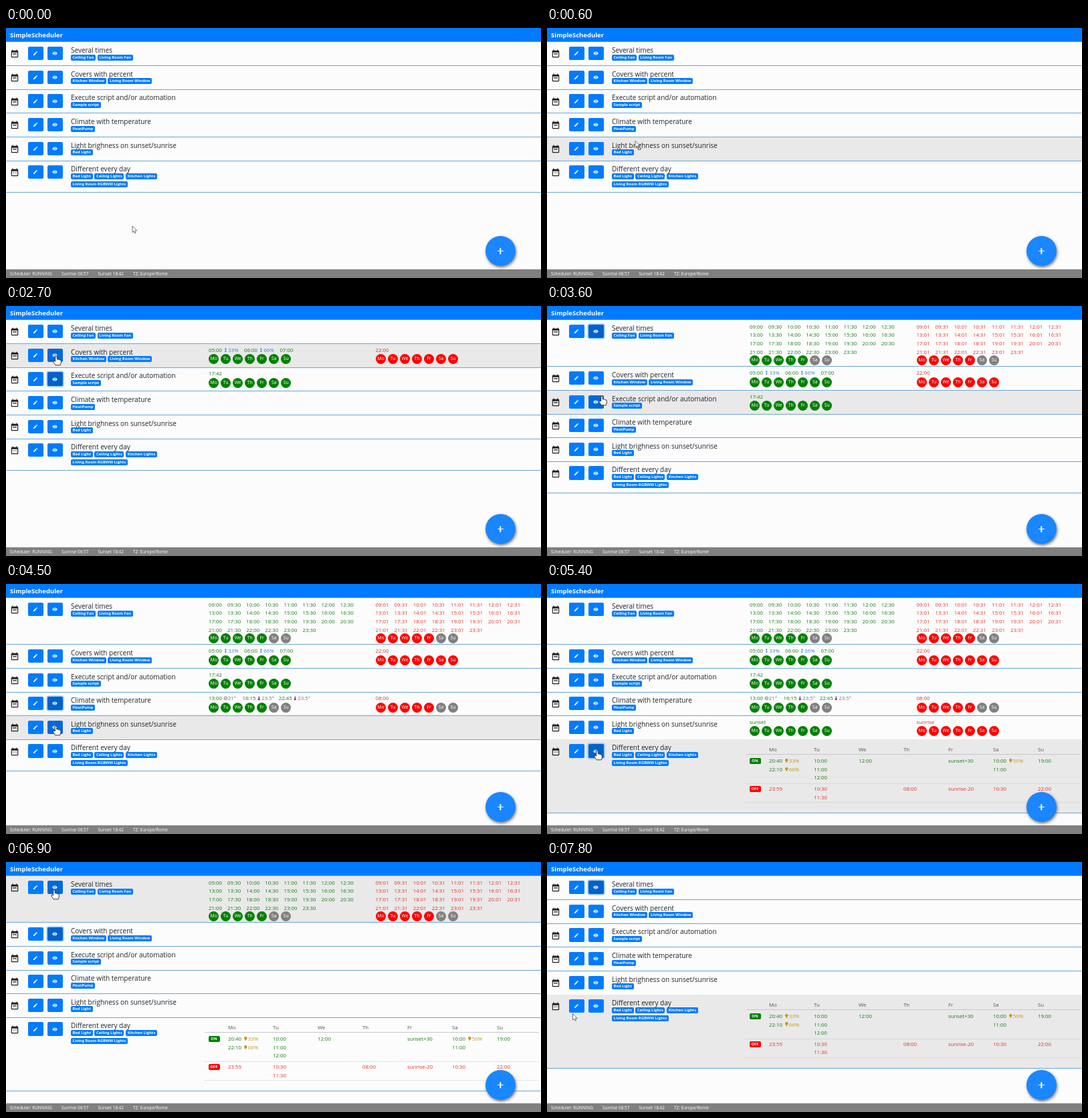
These frames come from a looping animation (800x375 px, 8000 ms). An HTML page:

```html
<!DOCTYPE html>
<html lang="en">
<head>
<meta charset="utf-8">
<title>SimpleScheduler</title>
<style>
  html, body { margin: 0; width: 100%; height: 100%; overflow: hidden; }
  body { position: relative; background: #fcfcfc; color: #212529; font: 7.85px/12px "Open Sans", "Noto Sans", sans-serif; white-space: nowrap; }
  div, span, svg { position: absolute; box-sizing: border-box; }
  .t { margin-top: -6px; }
  #bar { left: 0; top: 0; width: 800px; height: 21px; background: #007bff; border-bottom: 1px solid #4a9cf0; }
  #bar .t { color: #fff; font-size: 9.5px; font-weight: 700; }
  #foot { left: 0; top: 362px; width: 800px; height: 13px; background: #808080; color: #fff; font-size: 6.43px; }
  .row { left: 0; width: 800px; border-bottom: 1px solid #6ba6d8; }
  .row.hover { background: #e9e9e9; }
  .name { font-size: 10.05px; }
  .btn { top: 7px; width: 22.5px; height: 20.2px; border-radius: 2px; background: #007bff; }
  .btn.hover { background: #0069d9; }
  .btn.focus { background: #0062cc; box-shadow: 0 0 0 1.8px #80bdffb0; }
  .btn svg { left: 7.2px; top: 6.2px; width: 8px; height: 8px; fill: #fff; }
  .chips { left: 97px; top: 18.6px; width: 142px; display: flex; flex-wrap: wrap; gap: 3.2px 2.8px; }
  .chip { position: static; height: 9px; padding: 0 2.6px; border-radius: 2px; background: #007bff; color: #fff; font-size: 5.85px; font-weight: 700; line-height: 8.8px; }
  .flag { left: 302.5px; width: 17px; height: 9px; border-radius: 2px; color: #fff; font-size: 5.8px; font-weight: 700; line-height: 9px; text-align: center; }
  .day { width: 15px; height: 15px; border-radius: 50%; color: #fff; font-size: 6.9px; line-height: 14.6px; text-align: center; }
  .rule { left: 297px; width: 500px; border-top: 1px dotted #c8cacc; }
  .rule.head { border-top: 1px solid #c4c6c8; }
  .more { left: 0; top: 0; display: none; }
  .open .more { display: block; }
  #add { left: 717px; top: 312px; width: 45px; height: 45px; border-radius: 50%; background: #1a86ff; box-shadow: 1px 2px 4px #0008; }
  #add::before, #add::after { content: ""; position: absolute; background: #fff; left: 17.7px; top: 21.5px; width: 9px; height: 1.6px; }
  #add::after { transform: rotate(90deg); }
  #cursor svg { left: 0; top: 0; overflow: visible; stroke-linejoin: round; }
</style>
</head>
<body>
<div id="bar"></div>
<div id="list"></div>
<div id="foot"></div>
<div id="add"></div>
<div id="cursor">
  <svg id="arrow" width="8" height="12"><path d="M0 0V9.6L2.2 7.6 3.7 11 5.2 10.3 3.8 7.1H6.8Z" fill="#fff" stroke="#555" stroke-width=".8"/></svg>
  <svg id="hand" width="11" height="15"><path d="M-1.3 8V1Q-1.3-.2 0-.2T1.3 1V5Q2.7 4.2 3.6 5.4 5 4.8 5.8 6 7.4 5.6 7.4 7.4V10L6.2 13.8H-.8L-4 9.2Q-4.6 7.4-3 7Z" fill="#fff" stroke="#222" stroke-width=".9"/></svg>
</div>
<script>
const GREEN = '#177a17', RED = '#dd3328', GRAY = '#808080';
const DAYS = ['Mo', 'Tu', 'We', 'Th', 'Fr', 'Sa', 'Su'];
const $ = id => document.getElementById(id);

const text = (x, y, s, color = '', cls = '') =>
  `<span class="t ${cls}" style="left:${x}px;top:${y}px;color:${color}">${s}</span>`;

const icon = (path, style, box = 24) =>
  `<svg viewBox="0 0 ${box} ${box}" style="${style}"><path fill-rule="evenodd" d="${path}"/></svg>`;

const PENCIL = 'M3 17.2V21h3.8L17.8 10 14 6.2ZM20.7 7a1 1 0 0 0 0-1.4L18.4 3.3a1 1 0 0 0-1.4 0L15.1 5.1 18.9 8.9Z';
const EYE = 'M12 4.5C7 4.5 2.7 7.6 1 12 2.7 16.4 7 19.5 12 19.5S21.3 16.4 23 12C21.3 7.6 17 4.5 12 4.5ZM12 17a5 5 0 1 1 0-10 5 5 0 0 1 0 10ZM12 9a3 3 0 1 0 0 6 3 3 0 0 0 0-6Z';
const CALENDAR = 'M16 1V3H8V1H6V3H5A2 2 0 0 0 3 5V19A2 2 0 0 0 5 21H19A2 2 0 0 0 21 19V5A2 2 0 0 0 19 3H18V1ZM5 8H19V19H5Z';
const BAR = 'M7 10.5H17V13H7Z', DOTS = 'M7 11H9V13H7ZM11 11H13V13H11ZM15 11H17V13H15Z';
const ARROWS = 'M5 0 7.5 3H5.6V7H7.5L5 10 2.5 7H4.4V3H2.5Z';
const DIAL = 'M5 1A4 4 0 1 0 5 9 4 4 0 0 0 5 1ZM5 2.2A2.8 2.8 0 1 1 5 7.8 2.8 2.8 0 0 1 5 2.2ZM3 4.4H7V5.6H3Z';
const THERMO = 'M4 1.3Q5-.5 6 1.3V5.4A2.3 2.3 0 1 1 4 5.4Z';
const BULB = 'M5 0A3.3 3.3 0 0 0 3.4 6.3V7.5H6.6V6.3A3.3 3.3 0 0 0 5 0ZM3.7 8.2H6.3V9.5H3.7Z';

// a small symbol followed by its value
const value = (x, y, path, s, color, textColor = color) =>
  icon(path, `left:${x - .5}px;top:${y - 3.2}px;width:6.6px;height:6.6px;fill:${color}`, 10) + text(x + 6.8, y, s, textColor);

const week = (x, y, color, active = 7) => DAYS.map((d, i) =>
  `<span class="day" style="left:${x + 18 * i}px;top:${y - 7.5}px;background:${i < active ? color : GRAY}">${d}</span>`).join('');
const greenWeek = (n, y = 23.2) => week(303.2, y, 'green', n);
const redWeek = (n, y = 23.2) => week(553, y, 'red', n);

function halfHours(x, minute, color) {
  let out = '';
  for (let i = 0; i < 30; i++) {
    const hour = String(9 + (i >> 1)).padStart(2, '0');
    const min = String(minute + 30 * (i % 2)).padStart(2, '0');
    out += text(x + 28.1 * (i % 8), 9.6 + 12.6 * (i >> 3), hour + ':' + min, color);
  }
  return out;
}

function dayTable() {
  const col = i => 332 + 67 * i;
  const cell = (i, y, list, color) => list.split(' ').map((s, k) => text(col(i), y + 12.5 * k, s, color)).join('');
  const on = ['20:40 22:10', '10:00 11:00 12:00', '12:00', '', 'sunset+30', '10:00 11:00', '19:00'];
  const off = ['23:59', '10:30 11:30', '', '08:00', 'sunrise-20', '10:30', '22:00'];
  const flag = (y, s, color) => `<span class="flag" style="top:${y}px;background:${color}">${s}</span>`;
  const bulb = (x, y, s) => value(x, y, BULB, s, '#c8961e');
  const rule = (y, cls) => `<div class="rule ${cls}" style="top:${y}px"></div>`;
  return DAYS.map((d, i) => text(col(i), 14.6, d, '#555') + cell(i, 32, on[i], GREEN) + cell(i, 73.8, off[i], RED)).join('') +
    rule(22, 'head') + rule(66, '') + rule(93.6, '') +
    flag(27.4, 'ON', 'green') + flag(69.5, 'OFF', 'red') +
    bulb(355, 32, '33%') + bulb(355, 44.5, '66%') + bulb(690, 32, '50%');
}

const at = (x, s) => text(x, 9, s, GREEN);
const red = s => text(552.5, 9, s, RED);
const ROWS = [
  { name: 'Several times', chips: ['Ceiling Fan', 'Living Room Fan'], tall: 69.8,
    more: halfHours(303, 0, GREEN) + halfHours(552.5, 1, RED) + greenWeek(5, 60.6) + redWeek(5, 60.6) },
  { name: 'Covers with percent', chips: ['Kitchen Window', 'Living Room Window'],
    more: at(303, '05:00') + value(325.5, 9, ARROWS, '33%', '#3f86c6') + at(356, '06:00') +
      value(378.5, 9, ARROWS, '66%', '#3f86c6') + at(409.5, '07:00') + red('22:00') + greenWeek() + redWeek() },
  { name: 'Execute script and/or automation', chips: ['Sample script'], more: at(303, '17:42') + greenWeek() },
  { name: 'Climate with temperature', chips: ['HeatPump'],
    more: at(303, '13:00') + value(325, 9, DIAL, '21°', '#777') + at(353.5, '16:15') +
      value(375.5, 9, THERMO, '23.5°', '#8a2a9a', '#86688c') + at(407.7, '22:45') +
      value(429.5, 9, THERMO, '23.5°', '#8a2a9a', '#86688c') + red('08:00') + greenWeek(5) + redWeek(5) },
  { name: 'Light brighness on sunset/sunrise', chips: ['Bed Light'],
    more: at(303, 'sunset') + red('sunrise') + greenWeek() + redWeek() },
  { name: 'Different every day', chips: ['Bed Light', 'Ceiling Lights', 'Kitchen Lights', 'Living Room RGBWW Lights'],
    short: 47.2, tall: 110, more: dayTable() }
];

$('bar').innerHTML = text(6, 10.5, 'SimpleScheduler');
$('foot').innerHTML = [[6, 'Scheduler: RUNNING'], [83, 'Sunrise 06:57'], [137.5, 'Sunset 18:42'], [190, 'TZ: Europe/Rome']]
  .map(([x, s]) => text(x, 6.8, s)).join('');
$('list').innerHTML = ROWS.map((r, i) => `<div class="row">
  ${icon(CALENDAR + (i == 5 ? DOTS : BAR), 'left:6px;top:11.2px;width:14px;height:14px;fill:#222')}
  <div class="btn" style="left:33px">${icon(PENCIL, '')}</div><div class="btn" style="left:62px">${icon(EYE, '')}</div>
  ${text(97, 12, r.name, '', 'name')}
  <div class="chips">${r.chips.map(c => `<span class="chip">${c}</span>`).join('')}</div>
  <div class="more">${r.more}</div></div>`).join('');
const rowEls = [...document.querySelectorAll('.row')];

const STEP = 300, LOOP = 8000;
// step, x, y of the pointer tip
const PATH = [[0, 189, 297], [1, 189, 297], [3, 75, 42], [4, 75, 40], [5, 75, 67], [6, 76, 74], [7, 76, 110], [8, 76, 110],
  [10, 74, 40], [11, 74, 40], [12, 82, 135], [13, 76, 176], [14, 76, 176], [15, 74.5, 213], [16, 74.5, 213],
  [17, 75, 250], [18, 75, 250], [19, 75, 214], [20, 77, 168], [21, 76, 142], [22, 75, 106], [23, 72, 42],
  [24, 72, 42], [26, 38.5, 227.5]];
// step, row whose details are toggled
const CLICKS = [[3, 0], [4, 0], [6, 1], [8, 2], [10, 0], [14, 3], [16, 4], [18, 5], [19, 4], [21, 3], [22, 2], [23, 1], [24, 0]];

function pointer(step) {
  const n = PATH.findIndex(p => p[0] >= step);
  const b = PATH[n], a = PATH[Math.max(0, n - 1)];
  const f = b[0] == a[0] ? 0 : (step - a[0]) / (b[0] - a[0]);
  return [a[1] + (b[1] - a[1]) * f, a[2] + (b[2] - a[2]) * f];
}

function draw(step) {
  const [x, y] = pointer(step);
  const past = CLICKS.filter(c => c[0] <= step);
  const focus = past.length ? past[past.length - 1][1] : -1;
  let top = 21.2, onButton = false;
  rowEls.forEach((el, i) => {
    const { short = 35.6, tall = short } = ROWS[i];
    const open = past.filter(c => c[1] == i).length % 2 == 1;
    const height = open ? tall : short;
    const inside = y >= top && y < top + height;
    el.style.top = top + 'px';
    el.style.height = height + 0.5 + 'px';
    el.classList.toggle('open', open);
    el.classList.toggle('hover', inside);
    el.querySelectorAll('.btn').forEach((btn, k) => {
      const left = k ? 62 : 33;
      const over = x >= left && x < left + 22.5 && y >= top + 5.5 && y < top + 27.6;
      onButton ||= over;
      btn.classList.toggle('hover', over);
      btn.classList.toggle('focus', k == 1 && i == focus);
    });
    top += height;
  });
  $('cursor').style.transform = `translate(${x}px, ${y}px)`;
  $('hand').style.display = onButton ? 'block' : 'none';
  $('arrow').style.display = onButton ? 'none' : 'block';
}

const start = performance.now();
let shown = -1;
function tick() {
  const step = Math.floor((performance.now() - start) % LOOP / STEP);
  if (step != shown) draw(shown = step);
  requestAnimationFrame(tick);
}
tick();
</script>
</body>
</html>
```
